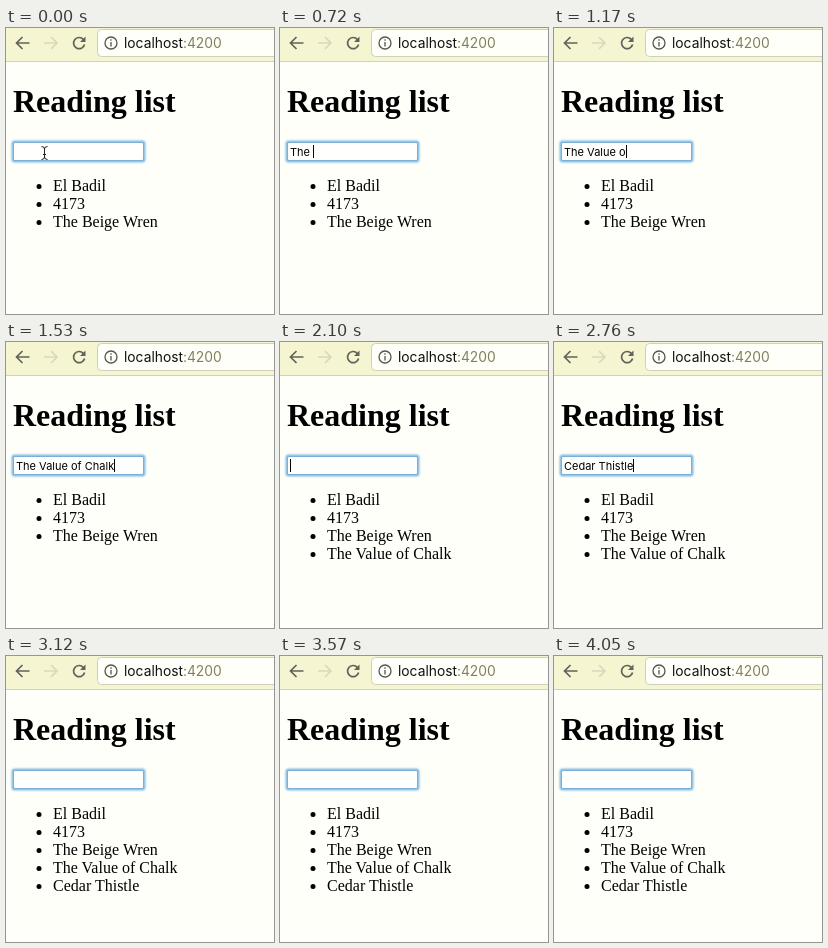
Animation, 268 px wide and 286 px high, one loop 4.11 s. Source, as an HTML page:

```html
<!DOCTYPE html>
<html lang="en">
<head>
<meta charset="utf-8">
<title>Reading list</title>
<style>
  html, body { margin: 0; width: 100%; height: 100%; overflow: hidden; background: #fffffa; }
  svg { position: absolute; left: 0; top: 0; }
  .url { font: 13.8px Inter, sans-serif; fill: #111; }
  .port { fill: #80805c; }
  .serif { font: 16px "Liberation Serif", serif; }
  .title { font-size: 32px; font-weight: bold; }
  #field {
    position: absolute; left: 8px; top: 115px; width: 129px; height: 17px;
    background: #fffffd; border-radius: 1px;
    box-shadow: 0 0 0 1px #78b0dc, 0 0 2px 2.5px #86bde0;
  }
  #entry {
    position: absolute; left: 10px; top: 117px; height: 14px;
    display: flex; white-space: pre; font: 11px/14px Inter, sans-serif; color: #000;
  }
  #caret { width: 1px; height: 13px; background: #000; }
</style>
</head>
<body>
<svg width="268" height="286" viewBox="0 0 268 286">
  <rect width="268" height="33" fill="#f5f5d2"/>
  <rect y="33" width="268" height="1" fill="#d2d1ba"/>
  <rect x="91.5" y="1.5" width="190" height="27" rx="4" fill="#fffffa" stroke="#cfcfbc"/>
  <g fill="none" stroke-width="1.7">
    <path d="M23.5 15H11M16.5 9L10.5 15L16.5 21" stroke="#62625a"/>
    <path d="M38 15H50.5M45 9L51 15L45 21" stroke="#d8d8bc"/>
    <path d="M77.3 11.3A5.6 5.6 0 1 0 78.6 16.5" stroke="#62625a"/>
  </g>
  <path d="M79.5 8.5V14H74Z" fill="#62625a"/>
  <g fill="none" stroke="#55554e" stroke-width="1.3">
    <circle cx="105" cy="15" r="6"/>
    <path d="M105 14V18.5M105 11.3V12.7"/>
  </g>
  <text class="url" x="118" y="20">localhost<tspan class="port">:4200</tspan></text>
  <text class="serif title" x="7" y="84">Reading list</text>
  <g id="list"></g>
</svg>
<div id="field"></div>
<div id="entry"><span id="typed"></span><span id="caret"></span></div>
<svg id="pointer" width="268" height="286" viewBox="0 0 268 286">
  <path d="M35.5 118.5Q38.5 118.5 38.5 121Q38.5 118.5 41.5 118.5M38.5 120V130M35.5 131.5Q38.5 131.5 38.5 129Q38.5 131.5 41.5 131.5M37 126.5H40" fill="none" stroke="#222"/>
</svg>
<script>
const LOOP = 4110;
const POINTER_HIDES = 570;
const books = ["El Badil", "4173", "The Beige Wren"].map(title => ({ title, added: 0 }));

// Each entry lists the moment of every key press and the moment of Enter.
const entries = [
  { title: "The Value of Chalk", added: 1650,
    keys: [570, 630, 690, 720, 840, 870, 900, 960, 1050, 1110, 1170, 1200, 1260, 1320, 1380, 1410, 1470, 1530] },
  { title: "Cedar Thistle", added: 2910,
    keys: [2130, 2190, 2220, 2280, 2310, 2370, 2400, 2460, 2490, 2550, 2640, 2700, 2760] }
];
const caretOff = [[0, 270], [480, 570], [1890, 2100], [3120, 3360], [3570, 3810], [4020, LOOP]];

const byId = id => document.getElementById(id);
const [list, typed, caret, pointer] = ["list", "typed", "caret", "pointer"].map(byId);
const show = (node, on) => { node.style.visibility = on ? "visible" : "hidden"; };

function svgNode(parent, tag, attributes) {
  const node = document.createElementNS("http://www.w3.org/2000/svg", tag);
  for (const name in attributes) node.setAttribute(name, attributes[name]);
  return parent.appendChild(node);
}

const rows = [...books, ...entries].map(({ title, added }, i) => {
  const row = svgNode(list, "g", { transform: `translate(0 ${163 + 18 * i})` });
  svgNode(row, "circle", { cx: 33, cy: -4.5, r: 2.5 });
  svgNode(row, "text", { x: 47, class: "serif" }).textContent = title;
  return { row, added };
});

function typedAt(time) {
  const entry = entries.find(({ keys, added }) => time >= keys[0] && time < added);
  return entry ? entry.title.slice(0, entry.keys.filter(key => key <= time).length) : "";
}

function draw(now) {
  const time = now % LOOP;
  typed.textContent = typedAt(time);
  show(caret, !caretOff.some(([from, to]) => time >= from && time < to));
  show(pointer, time < POINTER_HIDES);
  for (const { row, added } of rows) show(row, time >= added);
  requestAnimationFrame(draw);
}
draw(0);
</script>
</body>
</html>
```
